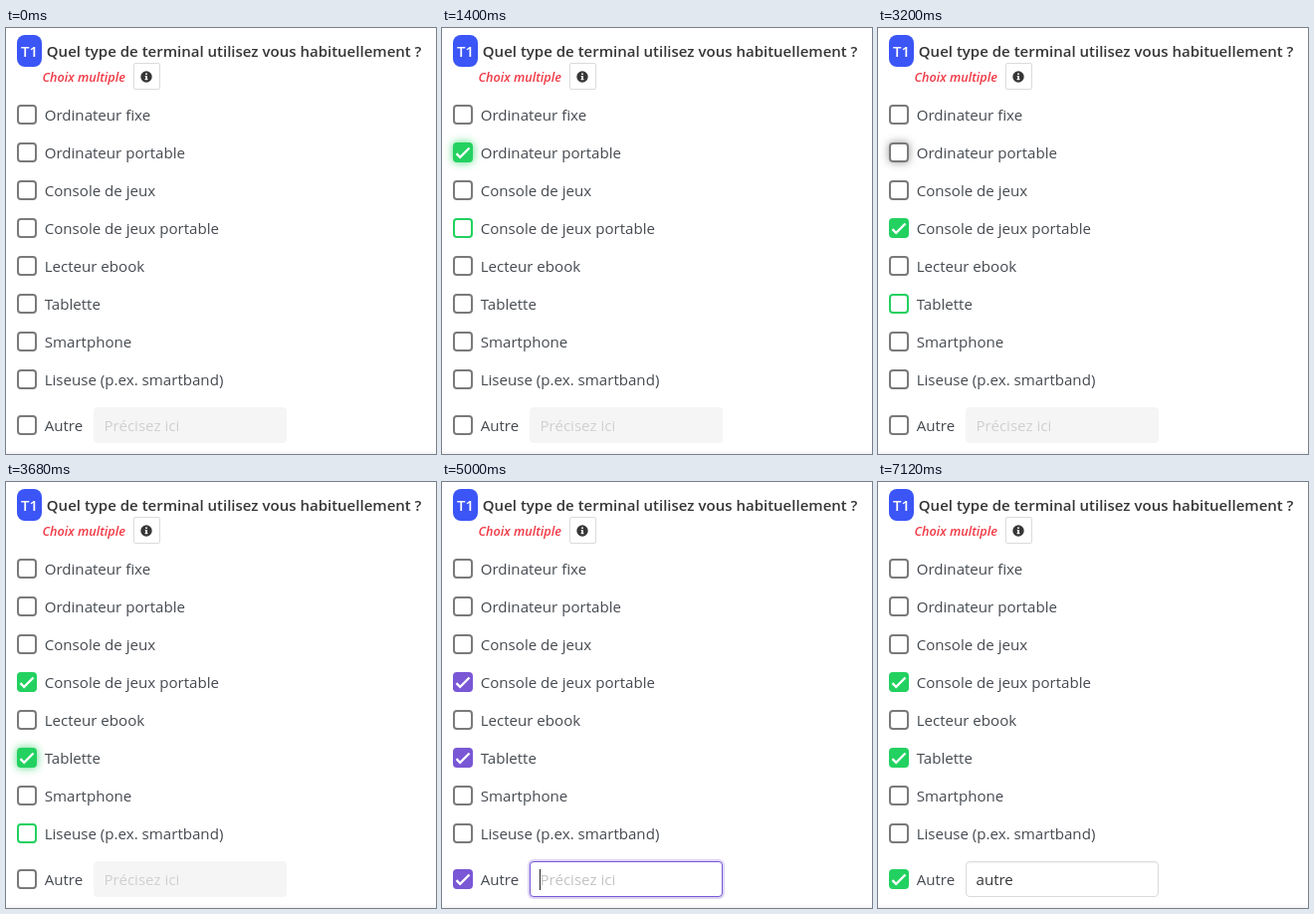
An HTML page that plays this animation: 432 px wide and 428 px high, repeating every 7160 ms.

```html
<!DOCTYPE html>
<html lang="fr">
<head>
<meta charset="utf-8">
<title>Sondage</title>
<style>
  html, body { margin: 0; width: 100%; height: 100%; overflow: hidden; background: #fff; }
  #stage {
    position: relative; width: 432px; height: 428px; overflow: hidden; background: #fff;
    font: 15.1px/20px "Open Sans", "Noto Sans", sans-serif; color: #454a50;
  }
  #stage > * { position: absolute; box-sizing: border-box; white-space: nowrap; }
  .badge {
    left: 11px; top: 7px; width: 25px; height: 31.5px; border-radius: 8px;
    background: #3b55f6; color: #fff; font-size: 15px; font-weight: 600;
    line-height: 33px; text-align: center;
  }
  .title { left: 40.8px; top: 13px; font-size: 15.03px; font-weight: 600; color: #363636; }
  .hint { left: 36.4px; top: 39px; font-size: 12.7px; font-weight: 600; font-style: italic; color: #f03a47; }
  .info { left: 128px; top: 35px; width: 27px; height: 27px; border: 1px solid #dbdbdb; border-radius: 2px; }
  .info svg { display: block; margin: 6.5px 6px; }
  .box { left: 11px; width: 20px; height: 20px; border: 2px solid #7a7a7a; border-radius: 4px; }
  .box svg { display: block; width: 16px; height: 16px; fill: #fff; }
  .label { left: 38.7px; }
  #field {
    left: 88px; top: 381px; width: 194px; height: 36px; padding-left: 9.5px;
    border: 1px solid; border-radius: 4px; line-height: 34px;
  }
  #text { display: inline-block; vertical-align: top; }
  #caret { position: absolute; top: 7px; width: 1px; height: 21px; background: #222; }
  .foot { left: 0; top: 424px; width: 432px; height: 4px; background: linear-gradient(#fff, #f3f3f3); }
  #ring { border: 1px solid #a80a14; border-radius: 50%; }
</style>
</head>
<body>
<div id="stage">
  <div class="badge">T1</div>
  <div class="title">Quel type de terminal utilisez vous habituellement ?</div>
  <div class="hint">Choix multiple</div>
  <div class="info">
    <svg width="12" height="12" viewBox="0 0 12 12">
      <circle cx="6" cy="6" r="5.7" fill="#363636"/>
      <path d="M5.1 2.4h1.8v1.7H5.1zM4.7 5h2.2v3.1h.5v1.1H4.6V8.1h.5V6.1h-.4z" fill="#fff"/>
    </svg>
  </div>
  <div id="field"><span id="text"></span><i id="caret"></i></div>
  <div class="foot"></div>
  <div id="ring"></div>
</div>
<script>
const LOOP = 7160, FADE = 150;
const GREEN = [35, 209, 96], PURPLE = [121, 87, 213], GREY = [122, 122, 122];
const OTHER = 8;
const labels = ["Ordinateur fixe", "Ordinateur portable", "Console de jeux",
  "Console de jeux portable", "Lecteur ebook", "Tablette", "Smartphone",
  "Liseuse (p.ex. smartband)", "Autre"];
const rowY = i => i === OTHER ? 399 : 87 + 38 * i;

// Each entry is [time, value]; the value holds until the next entry.
const toggles = {
  1: [[440, true], [2640, false]],
  3: [[1680, true]],
  5: [[3400, true]],
  8: [[4285, true]]
};
const focus = [[0, -1], [440, 1], [1680, 3], [2640, 1], [3400, 5], [4285, OTHER], [4870, -1]];
const hover = [[0, -1], [160, 1], [620, 2], [860, 3], [1960, -1], [2320, 2], [2400, 1],
  [2960, 2], [3040, 3], [3100, 4], [3160, 5], [3600, 6], [3660, 7], [3715, OTHER], [4600, -1]];
const tones = [[0, GREEN], [4295, PURPLE], [5480, GREEN]];
const field = [[0, "disabled"], [4285, "idle"], [4870, "focus"], [6700, "idle"]];
const typed = [[0, ""], [5480, "a"], [5680, "au"], [5840, "aut"], [6000, "autr"], [6160, "autre"]];
const clicks = [[440, 21, 126], [1680, 21, 202], [2640, 21, 126], [3400, 21, 278],
  [4285, 21.5, 401.5], [4905, 170, 401.5]];

const looks = {
  disabled: { background: "#f5f5f5", borderColor: "#f5f5f5", boxShadow: "none" },
  idle: { background: "#fff", borderColor: "#dbdbdb", boxShadow: "inset 0 1px 2px rgba(10,10,10,.05)" },
  focus: { background: "#fff", borderColor: "#7957d5", boxShadow: "0 0 0 2px rgba(121,87,213,.25)" }
};

const $ = id => document.getElementById(id);
const last = (track, t) => track.filter(e => e[0] <= t).pop();
const at = (track, t) => last(track, t)[1];
const easeOut = p => 1 - Math.pow(1 - Math.min(1, Math.max(0, p)), 1.7);
const rgba = (c, a = 1) => `rgba(${c.map(Math.round)},${a})`;

const tick = `<svg viewBox="0 0 1 1"><path d="M.04.627.146.521.323.697.854.167.96.273.323.91z"/></svg>`;

function add(className, y, html) {
  const el = document.createElement("div");
  el.className = className;
  el.style.top = y - 10 + "px";
  el.innerHTML = html;
  $("stage").insertBefore(el, $("field"));
  return el;
}

const boxes = labels.map((label, i) => {
  add("label", rowY(i), label);
  return add("box", rowY(i), tick);
});

function fillTone(t) {
  const [start, tone] = last(tones, t);
  const from = start ? at(tones, start - 1) : tone;
  const p = easeOut((t - start) / FADE);
  return tone.map((v, k) => from[k] + (v - from[k]) * p);
}

function drawBox(box, i, t) {
  const [since, on] = last([[-FADE, false], ...(toggles[i] || [])], t);
  const [toneStart, tone] = last(tones, t);
  const p = easeOut((t - since) / FADE);
  // A box ticked together with a tone change fades in from white in the new tone.
  const fill = Math.abs(since - toneStart) < 50 ? tone : fillTone(t);
  box.style.background = rgba(fill, on ? p : 1 - p);
  box.style.borderColor = rgba(on || at(hover, t) === i ? tone : GREY);
  box.style.boxShadow = at(focus, t) === i ? `0 0 8px ${rgba(on ? tone : GREY, .8)}` : "none";
  box.firstChild.style.visibility = on ? "visible" : "hidden";
}

function drawField(t) {
  const mode = at(field, t);
  const [since, value] = last(typed, t);
  Object.assign($("field").style, looks[mode]);
  $("text").textContent = value || "Précisez ici";
  $("text").style.color = value ? "#363636" : mode === "disabled" ? "#d0d0d0" : "#c3c3c3";
  const blink = (t - Math.max(since, 4870)) % 1000 < 500;
  $("caret").style.display = mode === "focus" && blink ? "block" : "none";
  $("caret").style.left = 9 + (value ? $("text").offsetWidth : 0) + "px";
}

function drawRing(t) {
  const click = clicks.find(c => t >= c[0] - 125 && t < c[0] + 75);
  $("ring").style.display = click ? "block" : "none";
  if (!click) return;
  const [time, x, y] = click;
  const r = 4 + 22.5 * Math.min(1, (t - time + 125) / 160);
  Object.assign($("ring").style, {
    left: x - r + "px", top: y - r + "px", width: 2 * r + "px", height: 2 * r + "px"
  });
}

function draw(t) {
  boxes.forEach((box, i) => drawBox(box, i, t));
  drawField(t);
  drawRing(t);
}

const begin = performance.now();
function frame() {
  draw((performance.now() - begin) % LOOP);
  requestAnimationFrame(frame);
}
frame();
</script>
</body>
</html>
```
